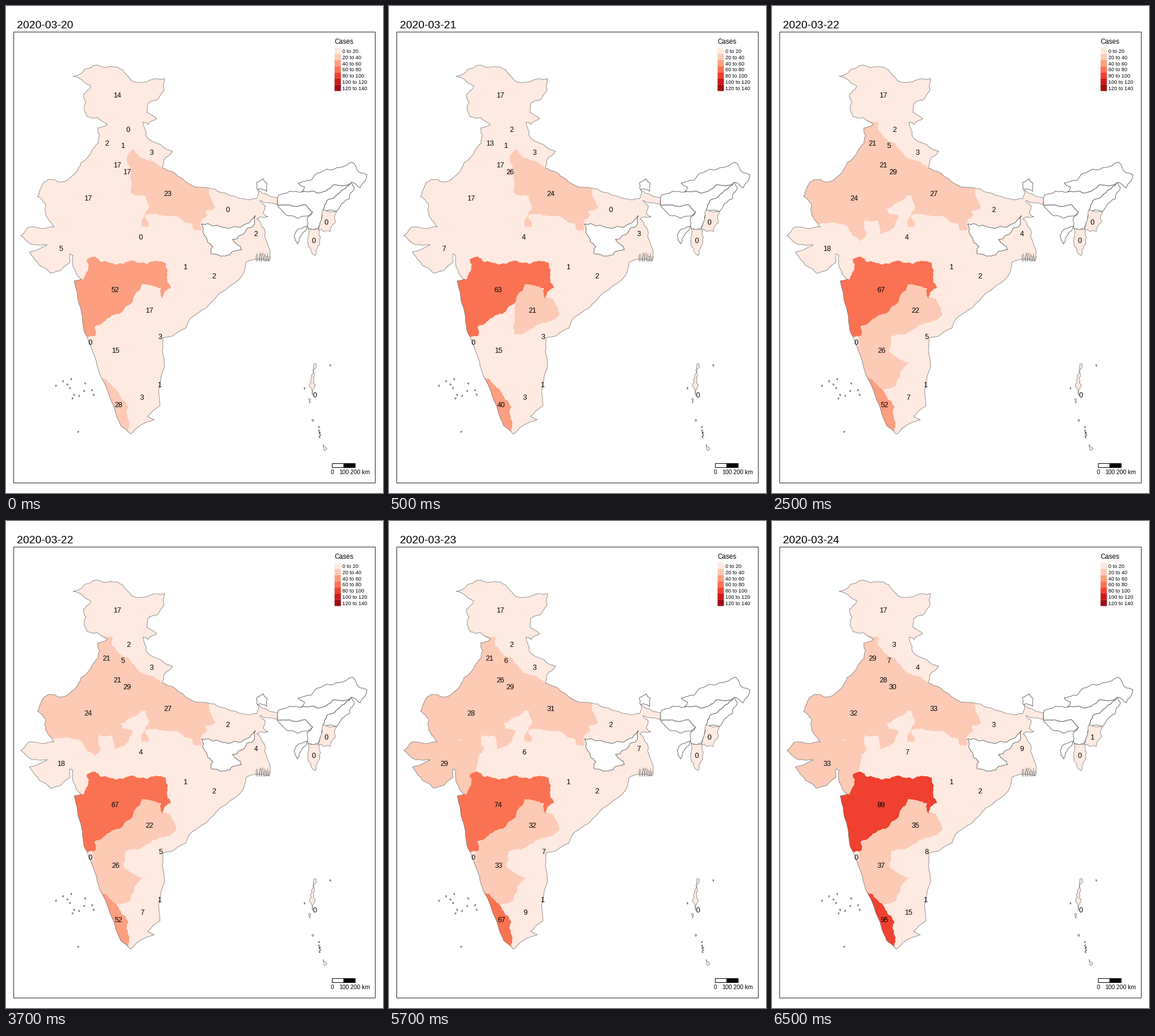
Recreate the animation shown at these times as a matplotlib script. Size 658x851 px, loop 8 s.

```python
import numpy as np
import matplotlib.pyplot as plt
from matplotlib.animation import FuncAnimation
from matplotlib.patches import Ellipse, Polygon, Rectangle

W, H, DPI = 658, 851, 100
PX = 72 / DPI
FONT = "Liberation Sans"
SHADES = plt.get_cmap("Reds")(np.linspace(0.0625, 0.8875, 7))
rng = np.random.default_rng(4)

fig = plt.figure(figsize=(W / DPI, H / DPI), dpi=DPI, facecolor="white")
ax = fig.add_axes([0, 0, 1, 1])
ax.set(xlim=(0, W), ylim=(H, 0))
ax.axis("off")


def border(*flat, rough=0.12):
    """Fractal line through key points: each pass shifts every midpoint sideways."""
    line = np.array(flat, float).reshape(-1, 2)
    for _ in range(3):
        a, d = line[:-1], np.diff(line, axis=0)
        side = np.column_stack([-d[:, 1], d[:, 0]])
        mid = a + d / 2 + rng.uniform(-rough, rough, (len(d), 1)) * side
        line = np.vstack([np.stack([a, mid], axis=1).reshape(-1, 2), line[-1:]])
    return line


def ring(*flat, rough=0.15):
    return border(*flat, *flat[:2], rough=rough)


def shape(points, fill, edge="none", lw=0, z=2):
    return ax.add_patch(Polygon(points, facecolor=fill, edgecolor=edge, zorder=z,
                                linewidth=lw * PX, joinstyle="round"))


def text(x, mid, s, size, ha="center"):
    return ax.text(x, mid + 0.36 * size, s, fontsize=size * PX, family=FONT,
                   ha=ha, va="baseline", color="black", zorder=9)


def box(x, y, w, h, fill="none", edge="black", lw=1):
    ax.add_patch(Rectangle((x, y), w, h, facecolor=fill, edgecolor=edge,
                           linewidth=lw * PX, snap=False, zorder=8))


def islet(x, y, w=1.6, h=2.8):
    ax.add_patch(Ellipse((x, y), w, h, angle=rng.uniform(-50, 50), fill=False,
                         edgecolor="#444", linewidth=0.8 * PX, zorder=5))


# Mainland, clockwise from the north-west; the sea coast is the smoothest part
mainland = np.vstack([
    border(117, 123, 137, 111, 160, 103, 186, 106, 203, 111, 208, 118, 220, 131,
           247, 132, 277, 127, 276, 147, 264, 164, 247, 171, 246, 186, 263, 197,
           248, 207, 239, 203, 244, 225, 270, 242, 291, 254, 278, 265, 273, 283),
    border(273, 283, 303, 299, 349, 317, 378, 326, 409, 336, 437, 337, 440, 321,
           475, 336, 474, 347, 443, 340, 453, 350, 449, 362, 457, 368, 438, 372,
           451, 390, 458, 420, 459, 445, 419, 448),
    border(419, 448, 412, 472, 396, 486, 373, 502, 350, 527, 320, 548, 314, 563,
           290, 577, 274, 580, 273, 604, 277, 630, 268, 662, 269, 698, 247, 717,
           259, 723, 234, 733, 217, 748, 200, 733, 185, 693, 164, 645, 150, 600,
           136, 567, 128, 522, 119, 480, rough=0.05),
    border(119, 480, 131, 478, 117, 456, 117, 436, 112, 433, 112, 447, 96, 462,
           78, 467, 58, 453, 41, 430, 72, 417, 46, 417, 26, 401, 38, 387, 84, 386,
           rough=0.08),
    border(84, 386, 69, 364, 69, 346, 55, 333, 62, 314, 74, 303, 104, 306,
           131, 274, 147, 259, 161, 240, 160, 213, 177, 207, 160, 195, 142, 194,
           136, 180, 140, 168, 135, 154, 148, 140, 117, 123),
])
land = shape(mainland, SHADES[0], z=1)
shape(mainland, "none", "#6a6a6a", 0.7, z=4)

# Shaded states overrun the coast and are clipped; later ones cover earlier
STATES = {
    "Gujarat": ring(10, 370, 90, 365, 140, 385, 157, 411, 154, 424, 152, 438,
                    150, 460, 140, 485, 20, 485),
    "Rajasthan": ring(150, 205, 186, 203, 187, 219, 203, 236, 224, 251, 240, 290,
                      240, 328, 234, 336, 200, 353, 204, 362, 221, 366, 207, 392,
                      189, 398, 184, 375, 163, 374, 166, 398, 154, 411, 133, 386,
                      107, 378, 60, 380, 40, 330, 125, 245),
    "Delhi": ring(206, 288, 214, 286, 216, 294, 209, 297),
    "Uttar Pradesh": ring(211, 268, 214, 257, 223, 250, 232, 263, 252, 270, 272, 283,
                          285, 280, 320, 298, 354, 312, 354, 326, 365, 352, 348, 358,
                          352, 366, 342, 374, 340, 392, 329, 392, 325, 380, 300, 368,
                          270, 366, 243, 366, 248, 386, 236, 387, 239, 370, 250, 350,
                          245, 332, 218, 326, 217, 297),
    "Karnataka": ring(150, 565, 180, 520, 235, 500, 235, 560, 219, 574, 208, 577,
                      206, 606, 219, 615, 240, 624, 224, 644, 217, 664, 190, 668,
                      155, 645, 140, 605, 153, 592, 152, 582),
    "Telangana": ring(237, 480, 268, 490, 271, 508, 284, 511, 297, 541, 268, 553,
                      245, 566, 219, 574, 220, 546, 219, 520, 222, 500),
    "Kerala": ring(160, 644, 175, 652, 193, 670, 203, 688, 214, 700, 213, 722,
                   210, 748, 190, 748, 150, 655),
    "Maharashtra": ring(108, 480, 135, 478, 143, 462, 141, 443, 155, 438, 165, 447,
                        192, 452, 218, 445, 245, 451, 279, 449, 281, 473, 288, 493,
                        278, 498, 273, 511, 270, 493, 237, 486, 226, 503, 218, 520,
                        198, 538, 180, 545, 155, 560, 154, 577, 138, 577, 115, 565),
}
areas = {name: shape(points, SHADES[0]) for name, points in STATES.items()}
for area in areas.values():
    area.set_clip_path(land)

# Regions without data; neighbours share their border lines
foothills = border(516, 325, 545, 327, 570, 313, 603, 308)
ridge = border(603, 308, 585, 323, 560, 340, 553, 357)
plateau = border(474, 348, 503, 350, 522, 347, 535, 360)
BLANK = [
    ring(341, 381, 367, 383, 399, 385, 435, 366, 434, 381, 421, 388, 395, 408,
         411, 426, 391, 435, 358, 433, 361, 420, 347, 402, rough=0.2),
    ring(439, 321, 438, 308, 449, 302, 455, 309, 455, 324),
    np.vstack([border(474, 348, 475, 331, 516, 325), foothills, ridge,
               border(553, 357, 550, 375, 545, 389, 527, 388, 526, 370, 535, 360),
               plateau[::-1]]),
    np.vstack([foothills[::-1],
               border(516, 325, 521, 316, 510, 309, 533, 304, 560, 285, 604, 273,
                      617, 291, 630, 295, 628, 303, 618, 318, 603, 308)]),
    np.vstack([ridge, border(553, 357, 577, 359, 599, 337, 608, 318, 603, 308)]),
    np.vstack([plateau, border(535, 360, 525, 367, 490, 366, 474, 348)]),
    ring(526, 385, 519, 396, 509, 416, 503, 400, 510, 390),
]
for points in BLANK:
    shape(points, "white", "#4a4a4a", 0.8, z=4)

# Eastern hill states and the islands with data
TINTED = [
    ring(553, 357, 577, 359, 575, 378, 566, 394, 545, 389, 550, 375),
    ring(527, 389, 547, 391, 549, 404, 540, 436, 533, 430, 526, 411),
    ring(537, 626, 542, 626, 538, 642, 540, 662, 535, 680, 530, 662, 534, 644, rough=0.25),
    ring(528, 686, 532, 687, 530, 694),
    ring(554, 766, 560, 773, 556, 777),
]
for points in TINTED:
    shape(points, SHADES[0], "#707070", 0.7, z=4)

# Scattered islets and the river delta
for x, y in rng.normal((120, 668), (15, 10), (12, 2)):
    islet(x, y)
for x, y in rng.normal((548, 746), (2.5, 4), (6, 2)):
    islet(x, y)
for x, y in ((126, 744), (521, 668), (566, 628)):
    islet(x, y)
islet(535.5, 724, 3, 3)
for x in np.arange(437, 460, 2):
    ax.plot(x + rng.uniform(-1, 1, 5), np.linspace(rng.uniform(431, 439), 446, 5),
            color="#666", lw=0.7 * PX, zorder=5)

# Frame, legend and scale bar
box(13.5, 45.5, 631, 788, edge="#222")
text(573, 62, "Cases", 11.6, "left")
for i, shade in enumerate(SHADES):
    box(573.5, 73 + 10.8 * i, 11, 10.8, shade, "none", 0)
    text(587, 78.7 + 10.8 * i, f"{20 * i} to {20 * i + 20}", 9.1, "left")
box(569.5, 799.5, 20, 7, "white")
box(589.5, 799.5, 20, 7, "black")
for x, s in ((569.7, "0"), (589.6, "100"), (618, "200 km")):
    text(x, 814, s, 10.4)

# Label position, then the count on each day
COUNTS = {
    "Jammu and Kashmir": (194.5, 156, 14, 17, 17, 17, 17),
    "Himachal Pradesh": (213.5, 216, 0, 2, 2, 2, 3),
    "Punjab": (175.5, 240, 2, 13, 21, 21, 29),
    "Chandigarh": (204, 243, 1, 1, 5, 6, 7),
    "Uttarakhand": (254, 256, 3, 3, 3, 3, 4),
    "Haryana": (194.5, 277, 17, 17, 21, 26, 28),
    "Delhi": (211, 290, 17, 26, 29, 29, 30),
    "Uttar Pradesh": (282.5, 328, 23, 24, 27, 31, 33),
    "Rajasthan": (143, 336, 17, 17, 24, 28, 32),
    "Bihar": (387, 356, 0, 0, 2, 2, 3),
    "West Bengal": (436, 397.5, 2, 3, 4, 7, 9),
    "Madhya Pradesh": (235.5, 404, 0, 4, 4, 6, 7),
    "Gujarat": (96, 423, 5, 7, 18, 29, 33),
    "Manipur": (558.5, 377, 0, 0, 0, 0, 1),
    "Maharashtra": (190, 495, 52, 63, 67, 74, 89),
    "Telangana": (250, 532, 17, 21, 22, 32, 35),
    "Andhra Pradesh": (269.5, 577.5, 3, 3, 5, 7, 8),
    "Karnataka": (191, 601, 15, 15, 26, 33, 37),
    "Tamil Nadu": (237.5, 684, 3, 3, 7, 9, 15),
    "Kerala": (196, 696.5, 28, 40, 52, 67, 95),
}
STEADY = [(536.5, 409, 0), (313, 455, 1), (362.5, 471, 2), (147.5, 587, 0),
          (268, 662, 1), (539.5, 679, 0)]
for x, y, count in STEADY:
    text(x, y, str(count), 12.5)
labels = {name: text(x, y, "", 12.5) for name, (x, y, *_) in COUNTS.items()}
title = text(19.3, 31.7, "", 19.2, "left")


def update(i):
    day = (i + 3) // 4
    title.set_text(f"2020-03-{20 + day}")
    for name, (_, _, *counts) in COUNTS.items():
        labels[name].set_text(str(counts[day]))
        if name in areas:
            areas[name].set_facecolor(SHADES[counts[day] // 20])
    return [title, *labels.values(), *areas.values()]


anim = FuncAnimation(fig, update, frames=16, interval=500, repeat=True, repeat_delay=0)
plt.show()
```
